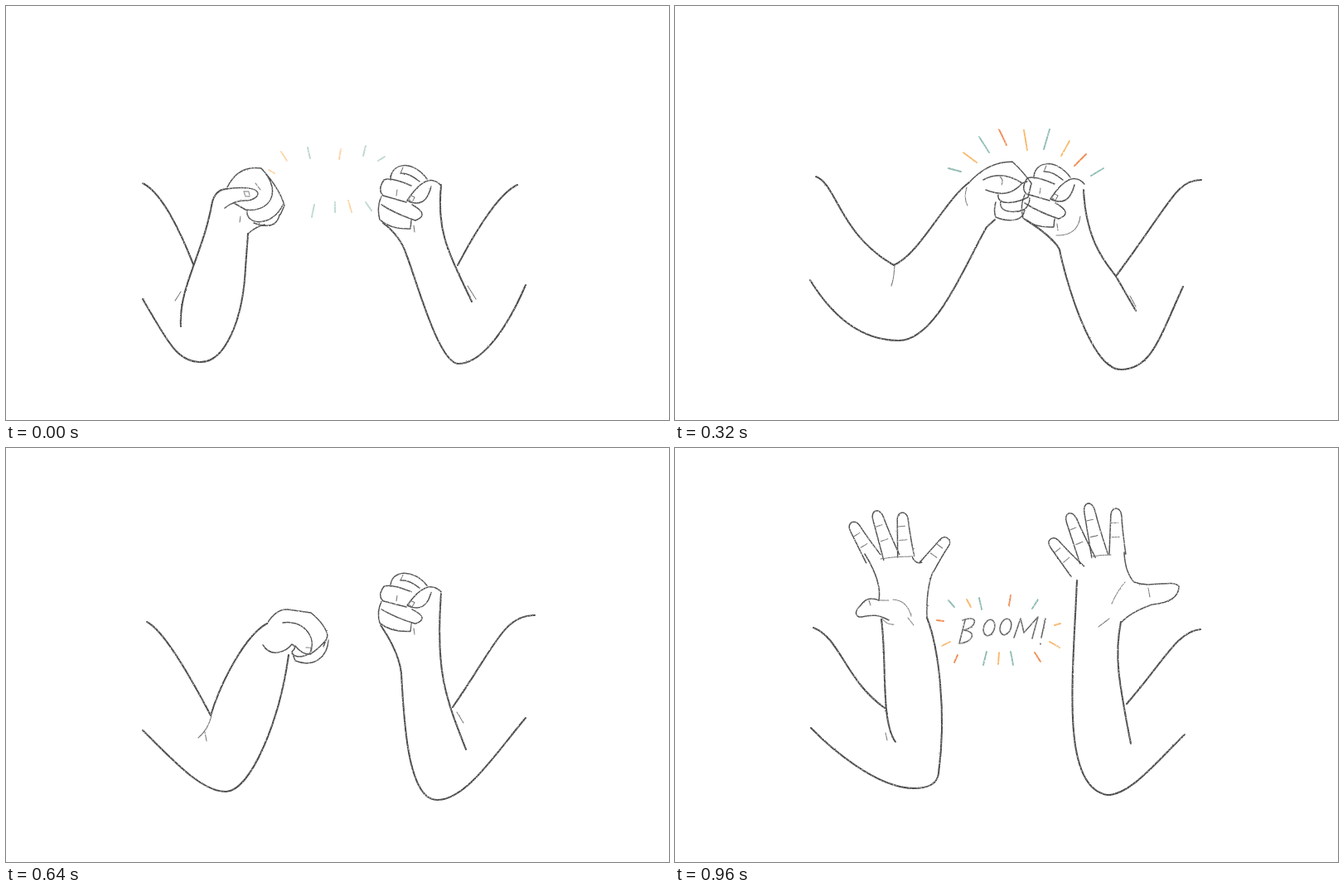
Animation of 800 by 500 pixels, one loop 1120 ms. Source, as an HTML page without scripts:

```html
<!DOCTYPE html>
<html lang="en">
<head>
<meta charset="utf-8">
<title>Fist bump</title>
<style>
  html, body { margin: 0; width: 100%; height: 100%; overflow: hidden; background: #fff; }
  svg { display: block; width: 100vw; height: 100vh; }
  path, ellipse {
    fill: none; stroke: #505050; stroke-width: 1.5;
    stroke-linecap: round; stroke-linejoin: round; vector-effect: non-scaling-stroke;
  }
  .arm { stroke: #4c4c4c; stroke-width: 2.1; }
  .fine { stroke: #777; stroke-width: 1.1; }
  .word * { stroke: #666; stroke-width: 1.6; }
  .teal { stroke: #8dbab2; stroke-width: 1.9; }
  .gold { stroke: #f8b668; stroke-width: 1.9; }
  .red { stroke: #ef8a50; stroke-width: 1.9; }
  .faint { opacity: .6; }
  .short { stroke-dasharray: 9 99; }

  /* seven poses, 160 ms each, hard cuts */
  .pose {
    visibility: hidden;
    animation: show 1120ms step-end infinite;
    animation-delay: calc(var(--i) * 160ms - 1120ms);
  }
  @keyframes show {
    0% { visibility: visible; }
    14.285714%, 100% { visibility: hidden; }
  }
</style>
</head>
<body>
<svg viewBox="0 0 800 500" role="img" aria-label="Two arms bump fists, then open their hands: BOOM!">
  <defs>
    <filter id="pencil" filterUnits="userSpaceOnUse" x="0" y="0" width="800" height="500" color-interpolation-filters="sRGB">
      <feTurbulence type="fractalNoise" baseFrequency=".6" numOctaves="2" seed="4" result="noise"/>
      <feDisplacementMap in="SourceGraphic" in2="noise" scale="1.6" xChannelSelector="R" yChannelSelector="G" result="line"/>
      <feComponentTransfer in="noise" result="grain"><feFuncA type="linear" slope="2"/></feComponentTransfer>
      <feComposite in="line" in2="grain" operator="in"/>
    </filter>

    <!-- finger pointing up, tip at the origin -->
    <g id="finger">
      <path d="M-10 58Q-8 30-6.500 9C-6-3 6-3 6.500 9Q7 30 10 58"/>
      <path class="fine" d="M-6 18h8M-6 36h9"/>
    </g>

    <g id="fist">
      <path d="M464 210C464 188 492 186 508 209M525 217Q508 198 484 235Q506 246 513 218M489 217Q464 206 456 210Q448 222 455 229L483 237"/>
      <path d="M453 230Q447 243 451 258Q464 270 488 269L489 259M453 240Q470 251 494 259Q512 252 490 240M476 202Q486 201 499 212"/>
      <path class="fine" d="M485 233l4-4 4 2-3 6zM479 195l-3 7M472 222l-1 7M492 265l1 8"/>
    </g>

    <g id="glow">
      <path class="teal" d="M364 171l3 13M434 169l-3 12M457 182l-8 5M434 237l7 10M397 237v12M372 240l-3 15"/>
      <path class="gold" d="M332 176l7 11M404 173l-2 12M413 235l4 14M317 198l7 4"/>
    </g>

    <g id="burst">
      <path class="teal" d="M330 196l15 4M367 158l12 19M452 149l-7 24M517 196l-15 9"/>
      <path class="gold" d="M348 177l16 12M421 150l4 24M476 163l-10 18"/>
      <path class="red" d="M391 149l9 19M496 179l-14 14"/>
    </g>

    <g id="boom" class="word">
      <path d="M349 198L342 226M346 198C368 190 362 208 347 210C366 212 356 226 342 226"/>
      <ellipse id="o" cx="378" cy="207" rx="6.500" ry="10" transform="rotate(18 378 207)"/>
      <use href="#o" x="20" y="-1"/>
      <path d="M408 219L416 196 420 213 437 194 430 220M446 196L441 219M440 226v1"/>
    </g>
  </defs>

  <g filter="url(#pencil)">
    <!-- wind up -->
    <g class="pose" style="--i:0">
      <path class="arm" d="M165 214Q193 228 226 312M165 354C195 405 206 430 235 430S286 380 289 316L292 275M211 387C208 340 238 300 249 236Q254 221 266 221"/>
      <path d="M266 221C320 214 305 236 289 235Q275 235 264 244M267 219Q280 192 308 196Q330 220 336 241L331 252M308 196C336 226 316 250 289 246L275 238M291 246C288 266 322 267 334 240M299 262Q326 272 330 252M292 275Q302 266 312 264"/>
      <path class="fine" d="M287 224h6l1 6h-5zM301 214l6 8M283 254l-1 7M204 356l7-11"/>
      <path class="arm" d="M617 216Q590 228 545 313M627 337C600 400 570 432 546 432S495 330 483 300Q476 278 455 262M525 216C520 270 530 290 562 357"/>
      <use href="#fist"/>
      <path class="fine" d="M557 338l10 16"/>
      <use href="#glow" class="faint"/>
    </g>

    <!-- approach -->
    <g class="pose" style="--i:1">
      <path class="arm" d="M167 197C200 205 190 245 258 299Q285 270 303 237T330 199M170 328C195 355 225 391 262 391S330 312 335 301L356 239"/>
      <path d="M330 199Q345 184 373 176Q400 190 402 203L395 215M329 212Q345 196 377 198C390 204 376 211 362 213M360 212Q364 219 383 219Q397 218 398 210M360 222C362 238 404 238 396 216M361 236Q370 243 382 244Q393 240 393 231M330 229Q346 242 363 234"/>
      <path class="fine" d="M371 200h7v6h-6zM366 188l4 6M257 300Q257 316 253 330M262 304v15"/>
      <path class="arm" d="M634 196C600 198 595 240 540 302M621 322C590 360 570 417 532 417S492 300 483 261L462 242M528 196C524 275 540 305 556 346"/>
      <use href="#fist" x="3" y="-25"/>
      <path class="fine" d="M547 321l4 15"/>
    </g>

    <!-- bump -->
    <g class="pose" style="--i:2">
      <path class="arm" d="M170 206C195 215 198 275 264 313C295 300 325 235 355 213M163 331C190 375 225 404 270 404S350 312 376 267L386 258"/>
      <path d="M355 213Q378 188 407 188Q420 200 430 214L426 231M372 210Q394 198 419 214C405 230 390 228 375 222M419 214l6-2M390 228C388 240 408 240 426 231M393 236C390 252 414 249 421 246Q428 241 428 232M387 237Q384 247 387 255C402 261 420 261 422 246"/>
      <path class="fine" d="M352 219Q348 232 353 241M392 206q5 4 2 10M265 314Q264 330 261 338"/>
      <path class="arm" d="M635 210C605 210 600 235 533 325M613 339C585 400 575 439 538 439S470 325 464 294Q456 279 423 258M493 222C496 290 525 315 533 328L556 368"/>
      <use href="#fist" x="-31" y="-2"/>
      <path class="fine" d="M460 277Q486 278 489 254M549 350l7 13"/>
      <use href="#burst"/>
    </g>

    <!-- recoil -->
    <g class="pose" style="--i:3">
      <path class="arm" d="M165 205C195 215 210 295 270 313C295 300 318 250 352 226M165 335C190 360 225 406 286 406C345 375 360 300 385 258"/>
      <path d="M352 226Q384 201 412 198Q436 215 435 235M371 216C395 205 417 218 417 234Q404 236 396 240Q408 255 424 241M432 232q-6 5-14 4M393 247C396 266 434 262 436 235M388 255C388 275 424 272 426 255M390 264l-7-4"/>
      <path class="fine" d="M356 226C350 248 375 260 393 244M400 237l8 3 2 5h-7zM270 314l-4 12"/>
      <path class="arm" d="M630 210C595 222 590 260 533 322M610 344C580 390 565 433 535 433S466 335 465 280Q462 262 434 247M502 203C505 310 545 310 544 359"/>
      <use href="#fist" x="-23" y="-17"/>
      <path class="fine" d="M493 247Q489 262 476 262"/>
      <use href="#burst" class="short"/>
    </g>

    <!-- pull back -->
    <g class="pose" style="--i:4">
      <path class="arm" d="M170 210Q194 222 247 323C260 280 290 225 315 212M165 341C200 375 235 415 265 415S330 330 341 250"/>
      <path d="M315 212Q326 194 340 195L368 199Q386 214 388 227L383 240M334 211C356 207 376 226 367 248M310 238C320 254 338 246 345 237Q352 240 345 246L349 257M349 239Q358 250 367 249Q378 242 386 232M349 257C372 266 388 252 389 232M345 248Q352 256 367 248"/>
      <path class="fine" d="M362 241h6l-1 8M248 323Q244 340 232 350M240 343l2 11"/>
      <path class="arm" d="M638 202C600 202 590 240 539 313M627 326C590 370 555 425 520 425S480 330 477 272Q474 246 452 214M525 176C518 270 530 300 555 364"/>
      <use href="#fist" transform="translate(0 -26) scale(1 .92)"/>
      <path class="fine" d="M544 319l8 13"/>
    </g>

    <!-- hands open -->
    <g class="pose" style="--i:5">
      <path class="arm" d="M165 207C200 222 215 285 245 305M165 331C200 362 245 409 276 409Q303 409 309 399C322 355 312 270 303 203M244 207C252 250 242 330 254 370"/>
      <use href="#finger" transform="translate(238 81) rotate(-11) scale(1 .95)"/>
      <use href="#finger" transform="translate(267 67) rotate(-3) scale(1.100 1.200)"/>
      <use href="#finger" transform="translate(300 82) rotate(6) scale(1 .93)"/>
      <use href="#finger" transform="translate(344 126) rotate(54) scale(1 .74)"/>
      <path d="M240 135Q247 160 241 177Q229 170 222 182Q224 190 236 193C244 210 250 213 257 214M242 178q7 12 1 22M303 203Q306 182 316 162"/>
      <path class="fine" d="M256 137h34M258 182Q277 188 286 214M301 170l6 6M242 340l-2 10"/>
      <path class="arm" d="M630 210C605 214 590 250 540 304M616 338C585 375 550 416 523 416C470 410 480 300 473 182M527 218C534 260 530 280 550 350"/>
      <use href="#finger" transform="translate(445 134) rotate(-36) scale(1 .85)"/>
      <use href="#finger" transform="translate(460 100) rotate(-30) scale(1 1.080)"/>
      <use href="#finger" transform="translate(483 82) rotate(-18) scale(1 1.160)"/>
      <use href="#finger" transform="translate(513 81) rotate(-13) scale(1 1.080)"/>
      <path d="M537 147Q541 165 551 175C575 178 586 165 594 168Q606 176 571 190C530 214 530 228 498 230"/>
      <path class="fine" d="M523 181Q510 192 505 215M556 177l3 9"/>
      <use href="#boom"/>
      <use href="#glow"/>
      <path class="teal" d="M321 222l8-3"/>
      <path class="gold" d="M455 224l8 5M342 237l-5 12"/>
      <path class="red" d="M454 207l12-3"/>
    </g>

    <!-- hands spread -->
    <g class="pose" style="--i:6">
      <path class="arm" d="M167 217C200 230 205 280 253 314M164 338C190 365 245 411 288 411Q316 411 318 393C328 320 318 240 304 205M249 207C256 260 248 330 266 355"/>
      <use href="#finger" transform="translate(213 90) rotate(-31) scale(1 .88)"/>
      <use href="#finger" transform="translate(242 76) rotate(-19) scale(1 1.020)"/>
      <use href="#finger" transform="translate(274 78) rotate(-5) scale(1 .92)"/>
      <use href="#finger" transform="translate(329 109) rotate(36) scale(1 .74)"/>
      <path d="M229 128Q250 162 246 184Q232 178 224 190Q214 200 222 204C232 204 240 198 258 208M304 205Q303 170 311 150M286 131Q290 141 298 138"/>
      <path class="fine" d="M248 134Q264 131 285 131M246 184h12M263 183Q280 184 285 203M250 206Q256 214 264 213M281 205l7 9M234 184l2 6M254 344l2 9"/>
      <path class="arm" d="M634 219C605 222 590 258 545 309M615 346C585 375 550 419 522 419C465 410 480 280 485 160M538 210C530 250 535 280 550 357"/>
      <use href="#finger" transform="translate(453 110) rotate(-40) scale(1 .88)"/>
      <use href="#finger" transform="translate(475 79) rotate(-22) scale(1 1.060)"/>
      <use href="#finger" transform="translate(498 67) rotate(-13) scale(1 1.120)"/>
      <use href="#finger" transform="translate(532 73) rotate(-2) scale(1 .96)"/>
      <path d="M542 126Q543 150 554 162C575 170 600 158 608 167Q608 186 576 189Q550 198 538 211"/>
      <path class="fine" d="M503 131Q514 129 526 129M543 162Q534 172 527 188M524 206l-13 10M571 169l2 11"/>
      <use href="#boom" x="1" y="10"/>
      <path class="teal" d="M330 184l7 8M367 181l3 14M438 183l-7 11M405 246l3 16M376 246l-4 16"/>
      <path class="gold" d="M352 183l5 9M458 214l7-2M452 234l12 7M391 247l-1 14M322 239l10-5"/>
      <path class="red" d="M405 178l-2 12M434 247l7 11M341 250l-4 9M316 208l8 1"/>
    </g>
  </g>
</svg>
</body>
</html>
```
